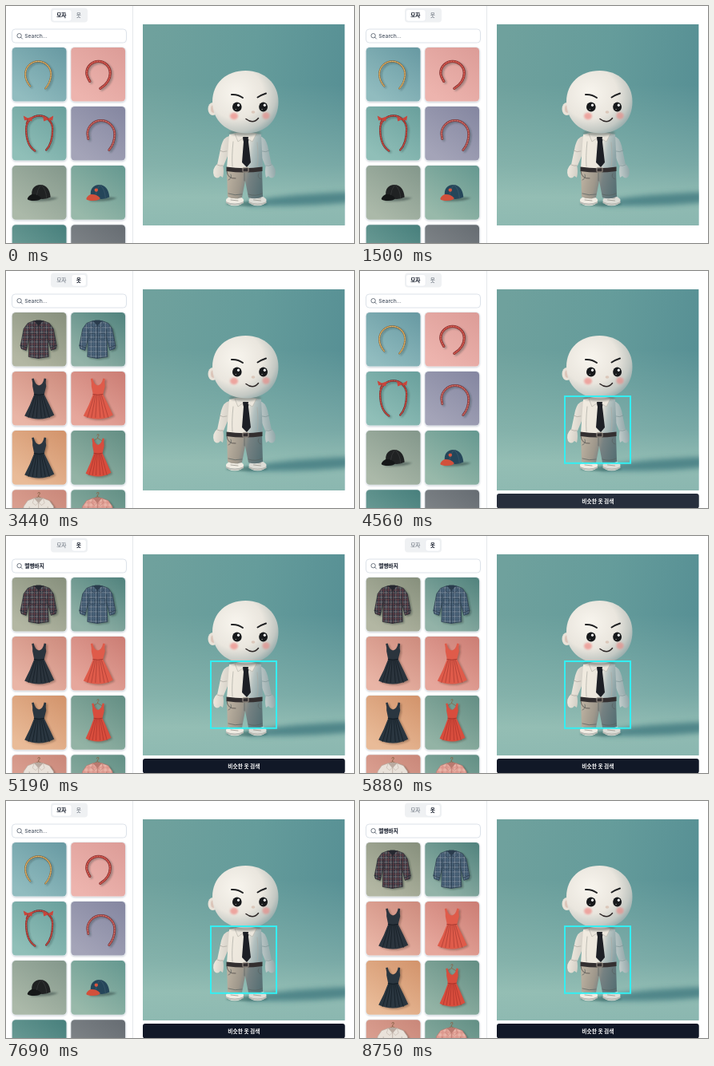
Recreate the animation shown at these times as an HTML page. Size 435 by 297 pixels, loop 8.81 s.

```html
<!DOCTYPE html>
<html lang="ko">
<head>
<meta charset="utf-8">
<style>
html, body { margin: 0; width: 100%; height: 100%; overflow: hidden; background: #fff; }
svg { display: block; width: 100%; height: 100%; }
text { font: 500 6.7px Inter, "Noto Sans CJK KR", "Noto Sans CJK", sans-serif; }
.bold { font-weight: 700; }
</style>
</head>
<body>
<svg id="stage" viewBox="0 0 435 297"></svg>
<script>
const LOOP = 8810;
const defs = [];
let uid = 0;

// Gradients: stops are "offset:colour[:opacity]"
const stops = list => list.map(s => {
  const [o, c, a = 1] = s.split(':');
  return `<stop offset="${o}" stop-color="${c}" stop-opacity="${a}"/>`;
}).join('');
function gradient(kind, attrs, ...list) {
  const id = 'g' + uid++;
  defs.push(`<${kind}Gradient id="${id}" ${attrs}>${stops(list)}</${kind}Gradient>`);
  return `url(#${id})`;
}
const backdrop = (dark, light) => gradient('linear', 'x1="1" y1="0" x2=".3" y2="1"', '0:' + dark, '1:' + light);
const across = (...s) => gradient('linear', 'x1="0" y1=".3" x2="1" y2=".5"', ...s);
const down = (...s) => gradient('linear', 'x1="0" y1="0" x2="0" y2="1"', ...s);

function plaid(base, light, accent) {
  const id = 'p' + uid++;
  defs.push(`<pattern id="${id}" width="6" height="6" patternUnits="userSpaceOnUse">
    <rect width="6" height="6" fill="${base}"/>
    <path d="M1.5 0V6M0 1.5H6" stroke="${light}" stroke-width=".7" opacity=".6"/>
    <path d="M4.4 0V6M0 4.4H6" stroke="${accent}" stroke-width="1.2" opacity=".6"/></pattern>`);
  return `url(#${id})`;
}

const path = (d, fill, extra = '') => `<path d="${d}" fill="${fill}" ${extra}/>`;
const line = (d, color, w = 1, extra = '') =>
  `<path d="${d}" fill="none" stroke="${color}" stroke-width="${w}" stroke-linecap="round" stroke-linejoin="round" ${extra}/>`;
const oval = (x, y, rx, ry, fill, extra = '') =>
  `<ellipse cx="${x}" cy="${y}" rx="${rx}" ry="${ry}" fill="${fill}" ${extra}/>`;
const rect = (x, y, w, h, r, fill, extra = '') =>
  `<rect x="${x}" y="${y}" width="${w}" height="${h}" rx="${r}" fill="${fill}" ${extra}/>`;
const group = (inner, attrs) => `<g ${attrs}>${inner}</g>`;
const soft = 'filter="url(#blur)"';

// Thumbnail art, drawn in a 69 x 69 cell
function band([x1, y1, l, top, r, x2, y2], color, dark, light, w) {
  const rx = (r - l) / 2, m = top + rx;
  const d = `M${x1} ${y1}Q${l} ${y1 - 7} ${l} ${m}A${rx} ${rx} 0 0 1 ${r} ${m}Q${r} ${y2 - 8} ${x2} ${y2}`;
  return group(line(d, '#233', w, 'opacity=".35"'), `transform="translate(2 1.5)" ${soft}`) +
    line(d, dark, w) + line(d, color, w * .65) +
    line(d, light, w * .3, 'stroke-dasharray="1 2.2" opacity=".8"');
}

function cap(crown, brim, badge) {
  return path('M24 43Q40 38 58 41Q50 46 24 45Z', '#233', 'opacity=".45" ' + soft) +
    path('M25 38Q24 25 36 24.500Q47 25 48.500 40Q42 43.500 34 42Q30 38 25 38Z', crown) +
    line('M36 25Q32 30 31 38M37 25Q43 30 43.500 41', '#fff', .4, 'opacity=".2"') +
    path('M25 36.500Q33 36 37 41.500Q35 44.500 28 44.500Q21 44.500 19.500 42.500Q20 39 25 36.500Z', brim) + badge;
}

const SHIRT = 'M28 11L20 14L15 21L11 42L12 46L18 48L22 32L21 56L33 58L46 56L45 32L49 48L55 46L56 42L52 21L47 14L39 11L33.500 16Z';
function shirt(fill, edge) {
  return group(path(SHIRT, '#1d2825', 'opacity=".4"'), `transform="translate(2 1.5)" ${soft}`) +
    path(SHIRT, fill, `stroke="${edge}" stroke-width=".7"`) +
    path('M28 11L33.500 18L39 11L36 10H31Z', edge) +
    path('M28 11L26 17L30 20L33.500 16L37 20L41 17L39 11L33.500 17Z', fill, `stroke="${edge}" stroke-width=".5"`) +
    line('M33.500 18V58M22 32V22M45 32V22M11 42L18.500 44.500M56 42L48.500 44.500', edge, .8) +
    rect(24, 27, 6.5, 7, .6, 'none', `stroke="${edge}" stroke-width=".5"`) +
    rect(36.5, 27, 6.5, 7, .6, 'none', `stroke="${edge}" stroke-width=".5"`);
}

const DRESS = 'M25 9.500L27.500 9Q29 17 34 18Q39 17 40.500 9L43 9.500Q42 15 43 19L40.500 29Q47 42 53 55Q44 60 34 60Q25 60 16 56Q23 43 28 29L26 19Q26.500 15 25 9.500Z';
function dress(fill, fold) {
  const pleats = [-13, -8, -3, 3, 8, 13].map(x => `M${34 + x * .35} 30L${34 + x} 58`).join('');
  return group(path(DRESS, '#412924', 'opacity=".35"'), `transform="translate(2 1.5)" ${soft}`) +
    path(DRESS, fill) + line(pleats, fold, 1, 'opacity=".7"') + line('M28 29Q34 30.500 40 29', fold, 1);
}
const hanger = line('M33.500 9V7Q36 6 35 4Q33 3 32.500 5M26 13L33.500 9L41 13', '#8a6549', .9);

function card(i, bg, art) {
  const x = i % 2 ? 80.8 : 7.2, y = 51.4 + (i >> 1) * 74.1;
  return group(
    rect(.3, 1, 68.6, 68.6, 5, '#64748b', 'opacity=".35" ' + soft) +
    rect(-.2, -.2, 69.2, 69, 5, '#e9edf0') +
    rect(.5, .5, 67.8, 67.6, 4.5, backdrop(...bg)) + art,
    `transform="translate(${x} ${y})"`);
}

function hats() {
  const bow = path('M20 15L14.500 12L16 18L20 17L25 19L26 13ZM45 16L39 13L40 19L45 17L51 18L52 12Z', '#c9463b') +
    line('M20 16L18 22M45 16L49 21', '#a9362f', 1.2);
  return [
    [['#6799a2', '#91bcbf'], band([23, 49, 17, 18, 49, 42, 52], '#cf9f55', '#6f5a3a', '#f0d293', 2.1)],
    [['#dc9c97', '#edb4ae'], band([24, 43, 20, 18, 49.5, 37, 52], '#bf453f', '#782f30', '#e07a68', 3.2)],
    [['#699f9c', '#90bfb8'], band([29, 56, 18, 12, 51, 43, 55], '#b83e36', '#593033', '#d9695a', 2.4) + bow],
    [['#8486a0', '#a4a4b8'], band([22, 41, 21, 18, 55, 48, 55], '#b04a48', '#6a3a42', '#dc9a8a', 3)],
    [['#83978b', '#abb9a9'], cap('#202223', '#151718', '')],
    [['#659890', '#98b9aa'], cap('#25465a', '#d2503b', oval(32, 31, 2.2, 2.2, '#d9553e'))],
    [['#477f7c', '#76a49d'], cap('#345', '#234', '')],
    [['#666c72', '#878c8f'], cap('#333', '#222', '')]
  ].map((c, i) => card(i, ...c)).join('');
}

function clothes() {
  const small = group(hanger + dress('#d84d3d', '#a63129'), 'transform="translate(5 1.500) scale(.86 .94)"');
  return [
    [['#868f7c', '#b3b7a3'], shirt(plaid('#2f323f', '#c0bab0', '#7d4547'), '#25272f')],
    [['#50827d', '#93b3a8'], shirt(plaid('#3a5067', '#c2cccf', '#587389'), '#2a3c4d')],
    [['#cd8b7d', '#e9b5a6'], dress('#2b343d', '#121a22')],
    [['#cb7d74', '#e6a79c'], dress('#df5b4a', '#a93b32')],
    [['#d2936b', '#e9bb98'], dress('#2a3640', '#101a22')],
    [['#638e84', '#93b3a5'], small],
    [['#c98779', '#e2aa9b'], hanger + shirt('#e9e2da', '#b9aaa0')],
    [['#628f85', '#92b3a6'], hanger + shirt(plaid('#e4a59a', '#f1cfc2', '#d68a80'), '#b9796f')]
  ].map((c, i) => card(i, ...c)).join('');
}

function doll() {
  const skin = gradient('radial', 'cx=".36" cy=".36" r=".74"', '0:#f8f5ee', '.55:#eae6de', '.82:#c3c8c3', '1:#8ba5a6');
  const light = across('0:#efe9df', '1:#d3cfc6');
  const shade = across('0:#8fa6a8', '1:#c3cccb');
  const cloth = across('0:#f1ebe0', '.55:#ebe6dc', '.75:#b4c1c0', '1:#8aa2a5');
  const trousers = across('0:#bdb2a1', '.4:#9e978b', '.6:#758182', '1:#587074');
  const eye = (x, rx) => oval(x, 126.5, rx, 6, '#17191b') + oval(x + 1.7, 124.2, 1.5, 1.7, '#fff') + oval(x - 1.5, 129.5, .7, .7, '#8b8b88');
  const side = (fill, edge) =>
    path('M279 163Q272 164 269 175L264 199Q268 203 272 200L280 181Z', fill) +
    path('M264 198Q257 204 260 213Q264 218 268 213L271 215Q273 207 271 199Z', fill) +
    line('M267 181Q271 184 276 182M264 199Q268 201 271 200', edge, .7);
  const shoe = (x, fill) => oval(x, 244, 11, 6.3, fill) +
    path(`M${x - 11} 245Q${x} 250 ${x + 11} 245V247Q${x} 252 ${x - 11} 247Z`, '#b9bab4') +
    line(`M${x - 5} 240L${x + 4} 241M${x - 5} 243L${x + 4} 244`, '#8d8880', .7);
  return path('M300 246Q340 236 432 233V246Q370 252 300 250Z', '#347078', 'opacity=".7" filter="url(#shade)"') +
    oval(301, 248, 26, 3, '#315e5b', 'opacity=".5" ' + soft) +
    side(light, '#aaa59c') + group(side(shade, '#7d9294'), 'transform="matrix(-1 0 0 1 596 0)"') +
    shoe(286, '#f0ece3') + shoe(314.5, '#dcdcd6') +
    path('M276 205H320L321 239Q312 243 303 240L299 219L295 240Q285 243 277 239Z', trousers) +
    line('M298 208V219M281 211Q283 216 278 218M316 210Q313 215 319 217M278 235Q286 238 295 236M303 236Q312 239 320 235', '#56605f', .7) +
    path('M279 161Q299 155 319 161L321 203Q298 207 276 203Z', cloth) +
    line('M284 170Q282 189 283 201M314 171Q316 190 314 201', '#a9aaa3', .7) +
    path('M275.500 201.500Q298 205 320.500 201.500V207Q298 210 275.500 207Z', '#332f30') +
    rect(296, 202.5, 7, 5.5, .8, 'none', 'stroke="#aaa094" stroke-width="1"') +
    line('M276 207Q277 217 287 216', '#514c49', .8) +
    path('M296 164H304L303 170L306 196L301 202L295 196L297 170Z', '#1d1f25') +
    path('M286 160L290 170L298.500 164L308 170L313 160Z', '#ece7dd', 'stroke="#b3afa7" stroke-width=".6"') +
    path('M296 164H303L302 170H297Z', '#1d1f25') +
    oval(299, 159, 20, 4, '#666e6b', 'opacity=".5" ' + soft) +
    oval(258.5, 129, 6, 8, '#e9e2d8') + oval(259, 129, 3, 5, '#cfada1', 'opacity=".55"') +
    path('M258 120C258 96 276 81 299.500 81C323 81 340.500 97 340.500 120C340.500 143 325 159 301 159.500C276 159.500 258 144 258 120Z', skin) +
    oval(285, 138, 5, 4.2, '#ee8f8a', 'opacity=".75" ' + soft) + oval(325, 137.5, 4.6, 4.2, '#e58d89', 'opacity=".7" ' + soft) +
    eye(288.8, 5.8) + eye(321.6, 5.4) +
    line('M282 111Q290 110.500 296 115', '#202123', 2) + line('M314.500 114.500Q319 111.500 325 109.500', '#202123', 2) +
    oval(309, 133, 2.4, 1.7, '#dbc8bb') +
    line('M300 141.500Q309 148.500 315.500 140.500', '#2c2525', 1.5);
}

function photo() {
  const wall = across('0:#6fa19d', '.5:#659c9b', '1:#568f94');
  const floor = down('.3:#9bc3b8:0', '.7:#9bc3b8:.5', '.86:#9bc3b8:.85', '1:#94beb5:.85');
  const area = fill => rect(171, 22.7, 252.6, 252.2, 0, fill);
  return group(area(wall) + area(floor) + doll(), 'clip-path="url(#frame)"');
}

const label = (x, y, s, attrs) => `<text x="${x}" y="${y}" ${attrs}>${s}</text>`;
const body =
  rect(0, 0, 435, 297, 0, '#fff') + rect(158, 0, 1, 297, 0, '#e5e7eb') +
  rect(56, 2.5, 46, 18, 4, '#eff1f3') +
  rect(57.5, 4.5, 24.5, 14.5, 3, '#fff', 'id="pill" stroke="#e3e7ec" stroke-width=".5"') +
  label(69.3, 14, '모자', 'id="hatTab" text-anchor="middle"') +
  label(90.8, 14, '옷', 'id="clothTab" text-anchor="middle"') +
  rect(7.5, 29, 143, 17, 4, '#fff', 'stroke="#dce2e9" stroke-width="1"') +
  `<circle cx="16.6" cy="37.2" r="2.7" fill="none" stroke="#4b5563" stroke-width=".8"/>` +
  line('M18.600 39.200L20.500 41.100', '#4b5563', .8) +
  label(23.3, 40, '', 'id="query"') +
  group(hats(), 'id="hats"') + group(clothes(), 'id="clothes"') + photo() +
  group(
    rect(256, 157, 82, 83.8, 0, 'none', 'stroke="#33eff2" stroke-width="2"') +
    rect(171, 279, 252.7, 18.5, 3, '#111827', 'id="button"') +
    label(297.4, 291.2, '비슷한 옷 검색', 'class="bold" fill="#fff" text-anchor="middle"'),
    'id="selection"');

const blur = (id, s) => `<filter id="${id}" x="-30%" y="-60%" width="160%" height="220%"><feGaussianBlur stdDeviation="${s}"/></filter>`;
const stage = document.getElementById('stage');
stage.innerHTML = `<defs>${defs.join('')}${blur('blur', 1)}${blur('shade', 3)}
  <clipPath id="frame"><rect x="171" y="22.7" width="252.6" height="252.2"/></clipPath></defs>${body}`;

const $ = id => document.getElementById(id);
const show = (id, on) => $(id).setAttribute('display', on ? 'inline' : 'none');
const within = (t, a, b) => t >= a && t < b;

function tab(id, on) {
  $(id).setAttribute('class', on ? 'bold' : '');
  $(id).setAttribute('fill', on ? '#111827' : '#5b6470');
}

function render(t) {
  const found = within(t, 4900, 7600) || t >= 8200;
  const dressed = within(t, 2000, 3870) || found;
  show('hats', !dressed);
  show('clothes', dressed);
  tab('hatTab', !dressed);
  tab('clothTab', dressed);
  $('pill').setAttribute('x', dressed ? 82 : 57.5);
  $('pill').setAttribute('width', dressed ? 18.3 : 24.5);
  $('query').textContent = found ? '멜빵바지' : 'Search...';
  $('query').setAttribute('class', found ? 'bold' : '');
  $('query').setAttribute('fill', found ? '#111827' : '#4b5563');
  show('selection', t >= 4190);
  $('button').setAttribute('fill', within(t, 4440, 5190) ? '#272e3c' : '#111827');
}

function tick() {
  render(performance.now() % LOOP);
  requestAnimationFrame(tick);
}
tick();
</script>
</body>
</html>
```
